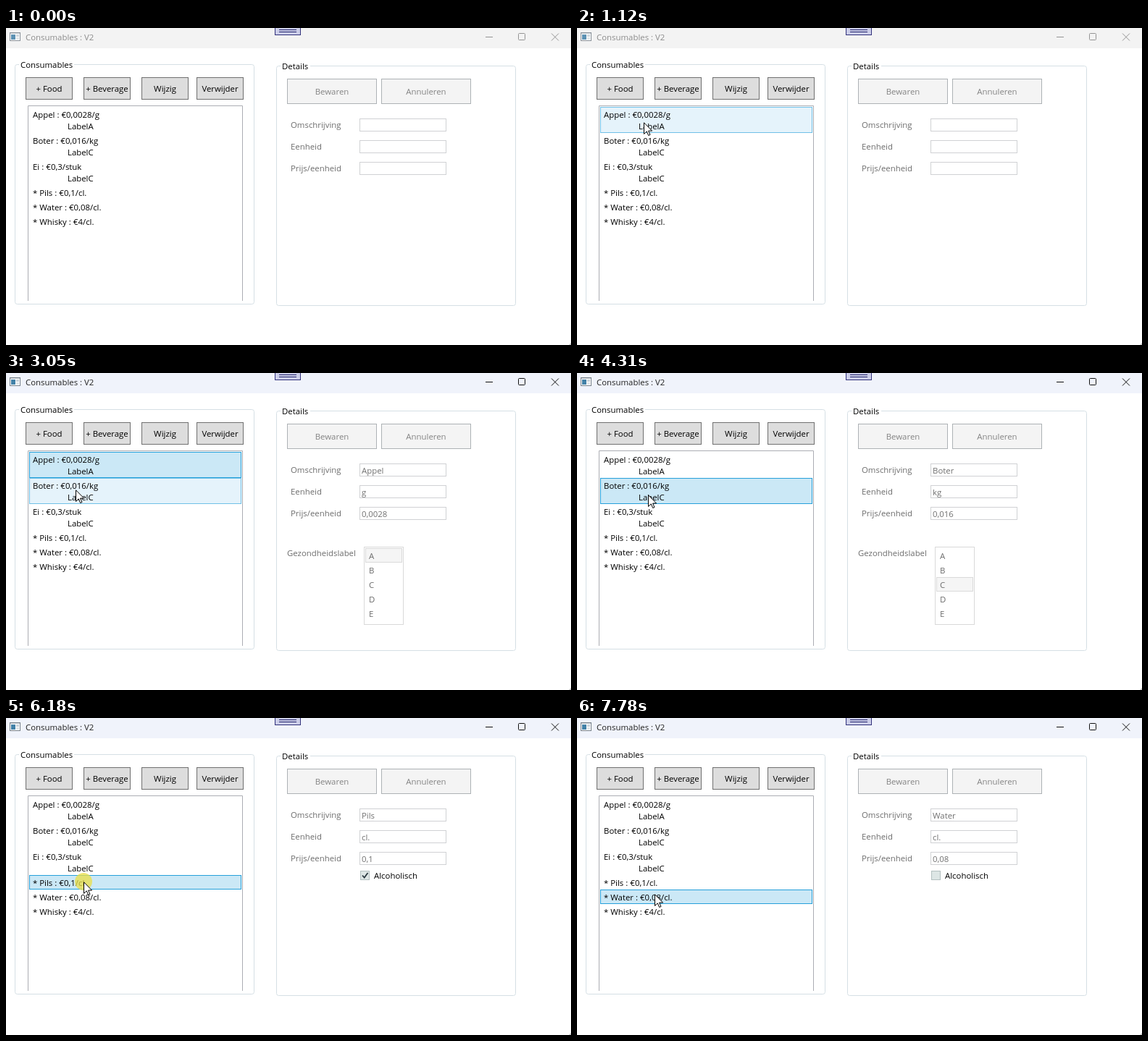
Animation of 780 by 438 pixels, one loop 8000 ms. Source, as an HTML page:

```html
<!DOCTYPE html>
<html lang="nl">
<head>
<meta charset="utf-8">
<title>Consumables</title>
<style>
  html, body { margin: 0; width: 100%; height: 100%; overflow: hidden; background: #fff; }
  svg { display: block; width: 780px; height: 438px; }
  text { font: 11.4px "Open Sans", "Noto Sans", sans-serif; white-space: pre; }
</style>
</head>
<body>
<svg id="stage" viewBox="0 0 780 438"></svg>
<script>
const LOOP = 8000;
const GREY = '#6d6d6d';

const items = [
  { name: 'Appel', price: '0,0028', unit: 'g', label: 'A' },
  { name: 'Boter', price: '0,016', unit: 'kg', label: 'C' },
  { name: 'Ei', price: '0,3', unit: 'stuk', label: 'C' },
  { name: 'Pils', price: '0,1', unit: 'cl.', alcohol: true },
  { name: 'Water', price: '0,08', unit: 'cl.', alcohol: false },
  { name: 'Whisky', price: '4', unit: 'cl.', alcohol: true },
];
let nextTop = 109;
for (const item of items) {
  item.top = nextTop;
  item.height = item.label ? 36 : 20;
  nextTop += item.height;
}

// Pointer moves: start, end, number of positions, from x y, to x y
const moves = [
  [710, 1120, 7, 629, 390, 92, 130],
  [1180, 1250, 2, 92, 126, 91, 121],
  [2830, 3050, 4, 92, 131, 96, 161],
  [4310, 4450, 3, 98, 168, 105, 205],
  [5580, 5630, 2, 105, 212, 107, 230],
  [5910, 5980, 2, 107, 228, 107, 226],
  [7040, 7180, 3, 107, 230, 107, 243],
];
// Press and release; each click selects the next item
const clicks = [[1710, 1910], [3450, 3650], [4780, 4970], [6180, 6310], [7580, 7780]];

const text = (x, y, s, fill = '#000', anchor = 'start') =>
  `<text x="${x}" y="${y}" fill="${fill}" text-anchor="${anchor}">${s}</text>`;
const box = (x, y, w, h, fill, stroke, r = 0) =>
  `<rect x="${x + .5}" y="${y + .5}" width="${w - 1}" height="${h - 1}" rx="${r}" fill="${fill}" stroke="${stroke}"/>`;
const line = (d, stroke) => `<path d="${d}" fill="none" stroke="${stroke}"/>`;
const fillRect = (x, y, w, h, fill) =>
  `<rect x="${x}" y="${y}" width="${w}" height="${h}" fill="${fill}"/>`;

function button(x, y, w, h, label, enabled) {
  const [fill, stroke, ink] = enabled ? ['#ddd', '#707070', '#000'] : ['#f4f4f4', '#adb2b5', '#838383'];
  return box(x, y, w, h, fill, stroke) + text(x + w / 2, y + h / 2 + 4.5, label, ink, 'middle');
}

function group(x, y, title, gap) {
  return box(x, y, 331, 332, 'none', '#d5dfe5', 3) +
    fillRect(x + 6, y, gap, 1, '#fff') + text(x + 8, y + 5, title);
}

function titleBar(active) {
  const ink = active ? '#111' : '#949494';
  return fillRect(0, 0, 780, 28, active ? '#f0f3fb' : '#f3f3f3') +
    `<g opacity="${active ? 1 : .85}">` +
    box(5, 6, 15, 12, '#fff', '#77818a') + fillRect(6, 7, 13, 1, '#c4cad0') +
    fillRect(7, 9, 6, 7, '#4382a8') + fillRect(14, 9, 4, 3, '#c9d3da') + fillRect(14, 13, 4, 3, '#dfe4e8') +
    '</g>' +
    text(27, 17, 'Consumables : V2', active ? '#222' : '#8c8c8c') +
    line('M662 12.5h10', ink) + box(707, 7, 10, 10, 'none', ink, 1) +
    line('M753 7.5l10 10m0-10l-10 10', ink) +
    box(371, -3, 36, 13, '#cccee9', '#33337c') + line('M377 2.5h24M377 5.5h24', '#22226b') +
    '<path d="M780 435v3h-3z" fill="#c8c8c8"/>';
}

const fixedParts =
  group(12, 50, 'Consumables', 76) + group(373, 52, 'Details', 41) +
  button(27, 68, 65, 31, '+ Food', true) + button(107, 68, 65, 31, '+ Beverage', true) +
  button(187, 68, 65, 31, 'Wijzig', true) + button(263, 68, 65, 31, 'Verwijder', true) +
  line('M30.5 377V107.5H326.5V377', '#abadb3') +
  button(388, 70, 124, 35, 'Bewaren', false) + button(518, 70, 124, 35, 'Annuleren', false) +
  ['Omschrijving', 'Eenheid', 'Prijs/eenheid'].map((label, i) =>
    text(393, 138 + 30 * i, label, GREY) + box(488, 125 + 30 * i, 120, 18, '#fff', '#d0d1d4')).join('');

function itemRow(item, selected, hovered) {
  const { top, height, name, price, unit, label } = item;
  const back = selected ? box(32, top, 293, height, '#cbe8f6', '#26a0da')
    : hovered ? box(32, top, 293, height, '#e5f3fb', '#70c0e7') : '';
  return back + text(37, top + 15, `${label ? '' : '* '}${name} : €${price}/${unit}`) +
    (label ? text(85, top + 31, 'Label' + label) : '');
}

function details({ name, price, unit, label, alcohol }) {
  let out = [name, unit, price].map((s, i) => text(491, 139 + 30 * i, s, '#707070')).join('');
  if (!label) {
    return out + box(489, 211, 13, 13, '#dde6e5', '#b4c0c0') +
      (alcohol ? '<path d="M492 217.5l2.7 3 4.8-6.5" fill="none" stroke="#2b3a40" stroke-width="1.8"/>' : '') +
      text(508, 222, 'Alcoholisch');
  }
  out += text(388, 253, 'Gezondheidslabel', GREY) + box(494, 240, 55, 108, '#fff', '#d9d9d9');
  [...'ABCDE'].forEach((letter, i) => {
    if (letter === label) out += box(496, 242 + 20 * i, 51, 20, '#f5f5f5', '#dadada');
    out += text(501, 257 + 20 * i, letter, GREY);
  });
  return out;
}

function pointerAt(t) {
  const move = moves.findLast(m => t >= m[0]);
  if (!move) return null;
  const [start, end, count, x0, y0, x1, y1] = move;
  const step = Math.floor(Math.min(1, (t - start) / (end - start)) * (count - 1) + 1e-6);
  const p = step / (count - 1);
  const eased = p * (2 - p);
  return { x: Math.round(x0 + (x1 - x0) * eased), y: Math.round(y0 + (y1 - y0) * eased) };
}

function scene(t) {
  const pointer = pointerAt(t);
  const selected = clicks.findLastIndex(c => t >= c[0]);
  const pressed = selected >= 0 && t < clicks[selected][1];
  const over = item => pointer && pointer.x >= 32 && pointer.x < 325 &&
    pointer.y >= item.top && pointer.y < item.top + item.height;

  let out = titleBar(selected >= 0) + fixedParts +
    items.map((item, i) => itemRow(item, i === selected, over(item))).join('');
  if (selected >= 0) out += details(items[selected]);
  if (pressed) out += `<circle cx="${pointer.x}" cy="${pointer.y}" r="12" fill="#ebdf45" fill-opacity=".75"/>`;
  if (pointer) {
    out += `<path transform="translate(${pointer.x} ${pointer.y})" fill="#fff" stroke="#000"
      d="M.5.8V16.5l3.8-3.6 2.4 5.6 2.3-1-2.4-5.4h5z"/>`;
  }
  return out;
}

const stage = document.getElementById('stage');
let shown = '';
function draw() {
  const next = scene(performance.now() % LOOP);
  if (next !== shown) stage.innerHTML = shown = next;
  requestAnimationFrame(draw);
}
draw();
</script>
</body>
</html>
```
